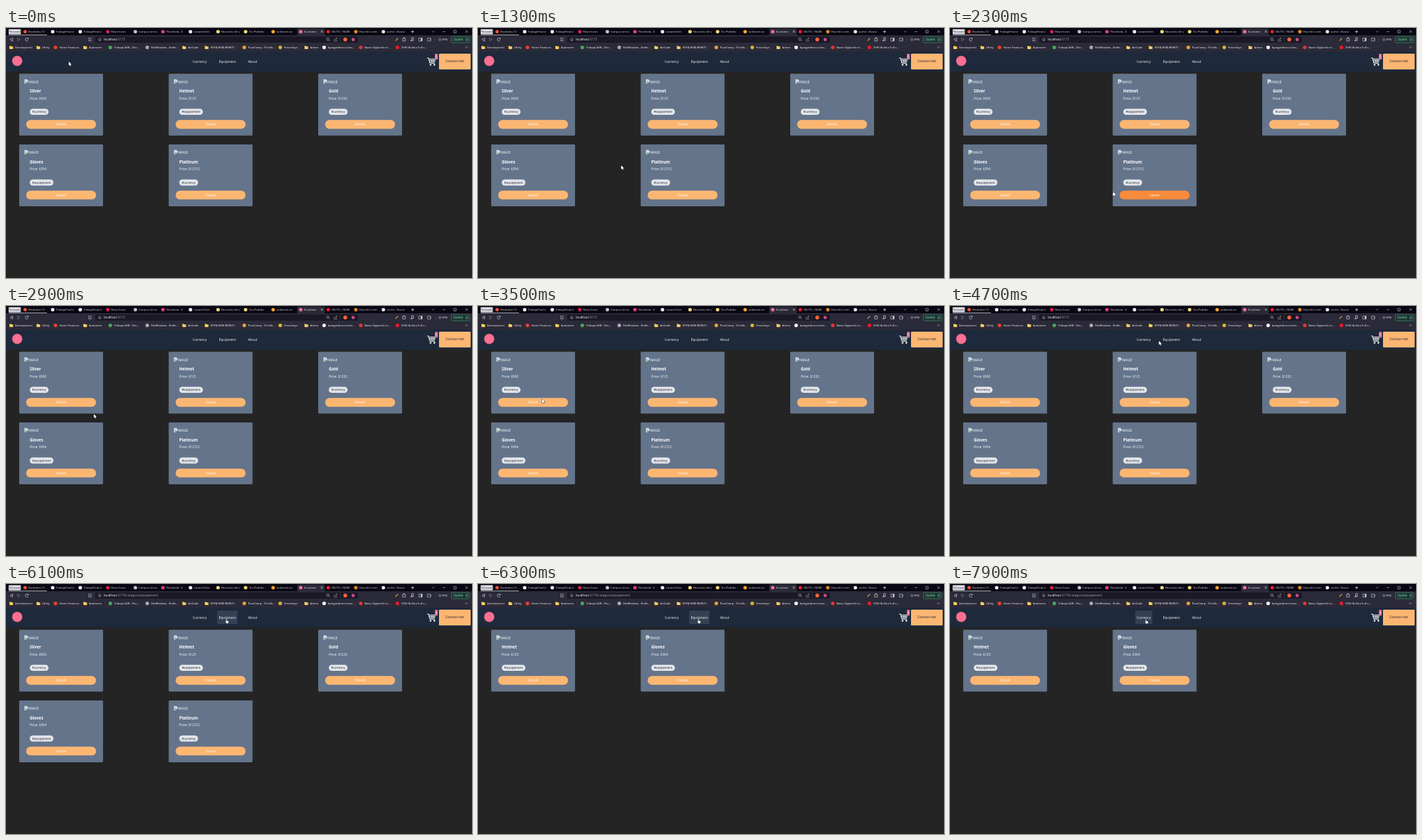
Write an HTML page with a canvas that moves like this. It is 706x380 px and loops after 8 s.

```html
<!DOCTYPE html>
<html lang="en">
<head>
<meta charset="utf-8">
<title>Shop walkthrough</title>
<style>
  html, body { margin: 0; width: 100%; height: 100%; overflow: hidden; background: #242424; }
  canvas { display: block; width: 706px; height: 380px; }
</style>
</head>
<body>
<canvas id="stage"></canvas>
<script>
const W = 706, H = 380, LOOP = 8000, STEP = 100;
const canvas = document.getElementById('stage');
const ctx = canvas.getContext('2d');
const dpr = window.devicePixelRatio || 1;
canvas.width = W * dpr;
canvas.height = H * dpr;

const FONT = '"Open Sans", "Noto Sans", sans-serif';
const ORANGE = '#fbb672', ORANGE_HOT = '#f98b3c', PINK = '#fb6f92', NAVY = '#1e293b';
const GREY = '#d6d6de', FOLDER = '#f8d05c', WHITE = '#ffffff', TOOLBAR = '#2b2a39';

// ---- drawing helpers ----
function box(x, y, w, h, color, r = 0) {
  ctx.fillStyle = color;
  ctx.beginPath();
  ctx.roundRect(x, y, w, h, r);
  ctx.fill();
}

function dot(x, y, r, color) {
  ctx.fillStyle = color;
  ctx.beginPath();
  ctx.arc(x, y, r, 0, Math.PI * 2);
  ctx.fill();
}

// y is the middle of the capital letters
function text(str, x, y, size, color, align = 'left', weight = 400) {
  ctx.font = `${weight} ${size}px ${FONT}`;
  ctx.textAlign = align;
  ctx.fillStyle = color;
  ctx.fillText(str, x, y + size * 0.36);
}

function path(d, color, width = 0.7, dx = 0, dy = 0) {
  ctx.save();
  ctx.translate(dx, dy);
  ctx.strokeStyle = color;
  ctx.lineWidth = width;
  ctx.stroke(new Path2D(d));
  ctx.restore();
}

function shape(d, x, y, fill, line, width) {
  const p = new Path2D(d);
  ctx.save();
  ctx.translate(x, y);
  ctx.lineJoin = 'round';
  ctx.strokeStyle = line;
  ctx.lineWidth = width;
  ctx.stroke(p);
  ctx.fillStyle = fill;
  ctx.fill(p);
  ctx.restore();
}

// ---- browser frame ----
const tabs = [
  ['Recibidos (1)', '#e8503f'], ['TrabajoFinal-e', '#f0f0f2'], ['TrabajoFinal-e', '#f0f0f2'],
  ['React Icons', '#d5224f'], ['Campus virtual', '#b9c3cf'], ['Floralinda - E', '#e23c78'],
  ['LunaresTom', '#f0f0f2'], ['Resumen del p', '#f1d77c'], ['Tus Pedidos', '#f1d77c'],
  ['aulanorte-ec', '#f6a52c'], ['E-comme', PINK], ['VELTO | NUBE', '#f0182c'],
  ['How do I center', '#e58330'], ['useful - Busca', '#e4e4e8']
];

// label, icon x, icon colour (none means a folder)
const marks = [
  ['Development', 8], ['Utility', 49], ['Home Finances', 75, '#e8452f'], ['Aulanorte', 120],
  ['Trabajo-K4B - Doc...', 158, '#47a85a'], ['FileMeadow - Endle...', 214, '#a9a9b2'],
  ['ArtCode', 270], ['VISTA WEB REMOT...', 304], ['PuzzCamp - The Be...', 361, '#e9a23b'],
  ['Heronkeys', 415.5, '#d8b62c'], ['Anime', 455], ['bytegardens-io/ma...', 482, '#f0f0f2'],
  ['Bazar Digital de m...', 537.5, '#e5352f'], ['(396) Build a Full s...', 593, '#f0182c']
];

function drawTabs() {
  box(0, 0, W, 11, '#090812');
  box(4, 1.8, 18.5, 7.6, '#dddde3', 1);
  text('Personal', 13.2, 5.6, 4.1, '#15151d', 'center');
  box(4, 10.2, 58, 0.7, '#dddde3');
  box(441, 0.8, 42, 10.4, TOOLBAR, 1.5);
  tabs.forEach(([label, color], i) => {
    const x = 29 + i * 41.75;
    dot(x, 5.6, 2.7, color);
    ctx.save();
    ctx.beginPath();
    ctx.rect(x + 4, 0, i === 10 ? 20 : 28.5, 11);
    ctx.clip();
    text(label, x + 5, 5.6, 4.2, i === 10 ? WHITE : GREY);
    ctx.restore();
  });
  path('M477 4l3 3m0-3l-3 3', WHITE, 0.6);
  path('M613.8 5.6h4.4m-2.2-2.2v4.4', WHITE, 0.7);
  path('M645.3 4.6l1.7 1.7 1.7-1.7M661.3 5.6h4M678.5 3.8h3.6v3.6h-3.6zM696 3.6l3.8 3.8m0-3.8l-3.8 3.8', GREY, 0.6);
}

function drawToolbar(url) {
  box(0, 11, W, 25.5, TOOLBAR);
  path('M10 15v5l-3.8-2.5z', GREY, 0.7);
  path('M17.6 15v5l3.8-2.5z', '#7b7986', 0.7);
  path('M33.4 16.2a2.3 2.3 0 1 0 .2 2.4M33.8 14.8v1.9h-1.9', GREY, 0.7);
  path('M125.6 15.2h3.2v4.9l-1.6-1.3-1.6 1.3z', GREY, 0.6);
  box(135, 13, 398, 9.2, '#1a1925', 1.5);
  path('M144 17.6a2 2 0 1 1-4 0a2 2 0 1 1 4 0M142 17.2v1.6', GREY, 0.5);
  text('localhost', 148, 17.7, 4.8, WHITE);
  text(url, 148 + ctx.measureText('localhost').width, 17.7, 4.8, '#a2a1ad');
  path('M489.3 17a1.8 1.8 0 1 1-3.6 0a1.8 1.8 0 1 1 3.6 0M488.9 18.4l1.4 1.5', GREY, 0.6);
  path('M497.2 16.8v3.2h4v-1.6M498.6 18q.2-2.2 3-2.2m-1.1-1.2l1.2 1.2-1.2 1.2', GREY, 0.5);
  box(506.5, 14, 0.5, 7, '#494758');
  dot(514, 17.5, 2.9, '#f2663a');
  dot(526, 17.5, 2.5, '#c64a8c');

  path('M590 19.3l3.8-3.8', '#f0a04b', 1.2);
  path('M601 15.8h4.2v4h-4.2zM602.3 15.8v-1h1.6v1', GREY, 0.7);
  path('M614.5 19.2v-4.3l2.6-.5v4', GREY, 0.7);
  dot(613.8, 19.3, 0.9, GREY);
  dot(616.4, 18.6, 0.9, GREY);
  path('M625.5 15.2h5v4.6h-5z', GREY, 0.6);
  box(628.5, 15.2, 2, 4.6, GREY);
  path('M638.6 15.5h5v4.3h-5zM641.6 17.6h2', GREY, 0.6);
  box(650.3, 14, 0.5, 7, '#494758');
  path('M659 17.6a1.6 1.6 0 1 1-3.2 0a1.6 1.6 0 1 1 3.2 0', GREY, 0.6);
  text('VPN', 660.5, 17.7, 4.2, '#f2f2f5');
  box(674.6, 13, 28, 9.4, '#203634', 1.5);
  ctx.strokeStyle = '#43996f';
  ctx.lineWidth = 0.6;
  ctx.stroke();
  text('Update', 677.5, 17.7, 4.4, '#72dca5');
  path('M696.5 16h4m-4 1.6h4m-4 1.6h4', '#72dca5', 0.5);
}

function drawMarks() {
  for (const [label, x, color] of marks) {
    if (color) dot(x, 29.5, 2.7, color);
    else {
      box(x - 2.7, 27.2, 2.6, 2, FOLDER, 0.5);
      box(x - 2.7, 27.9, 5.4, 4, FOLDER, 0.5);
    }
    text(label, x + 5.8, 29.5, 4.2, WHITE);
  }
  path('M696 28.2l1.3 1.3-1.3 1.3m1.8-2.6l1.3 1.3-1.3 1.3', GREY, 0.5);
}

// ---- shop page ----
const links = [
  ['Currency', 293.6, 26], ['Equipment', 335.3, 31], ['About', 373.5, 21]
];
const items = [
  ['Silver', 500, 'currency'], ['Helmet', 125, 'equipement'], ['Gold', 1232, 'currency'],
  ['Gloves', 364, 'equipement'], ['Platinum', 12312, 'currency']
];

function drawHeader(hover) {
  box(0, 36.3, W, 29.7, NAVY);
  dot(17, 50, 7.7, PINK);
  for (const [label, x, w] of links) {
    if (label === hover) box(x - w / 2, 40.6, w, 20.5, '#334155', 0.8);
    text(label, x, 51.2, 5.05, WHITE, 'center');
  }
  // cart
  path('M637.8 45.6h2.4l2 8.1h7.8', WHITE, 1);
  path('M640.6 47h10l-1.5 4.9h-7.2zM641.2 49.4h8.7M643.8 47l.6 4.9M646 47v4.9M648.3 47l-.6 4.9', WHITE, 0.8);
  dot(643.2, 56, 1.3, WHITE);
  dot(649, 56, 1.3, WHITE);
  box(649.8, 39.3, 4.3, 8.6, PINK, 1.2);
  text('0', 652, 43.6, 4.3, WHITE, 'center');
  box(656, 39, 48, 24, ORANGE, 1.3);
  text('Contact me!', 680, 50, 5.05, '#1b2232', 'center');
}

function drawBrokenImage(x, y) {
  shape('M0 0H3.4L5 1.6V3.2L2.2 6H0z', x, y, '#f4f7fa', '#f4f7fa', 0.2);
  box(x + 0.7, y + 0.9, 3, 2.6, '#b4d0f2');
  shape('M0 2.6L1.5 1 2.8 2.2 2 3H0z', x + 0.7, y + 2.2, '#4fa64f', '#4fa64f', 0.2);
}

function drawCard([name, price, tag], i, hover) {
  const x = 20 + (i % 3) * 226.5, y = 69.5 + Math.floor(i / 3) * 107.4;
  box(x, y, 127, 94, '#64748b', 1.3);
  drawBrokenImage(x + 8.2, y + 8.8);
  text('IMAGE', x + 14, y + 12.2, 5, WHITE);
  text(name, x + 16, y + 26.4, 6.2, WHITE, 'left', 700);
  text('Price: $' + price, x + 16, y + 37.4, 4.95, WHITE);
  const label = '#' + tag;
  ctx.font = `400 4.5px ${FONT}`;
  box(x + 16, y + 53.3, ctx.measureText(label).width + 7.4, 9.3, '#e5e7eb', 4.65);
  text(label, x + 19.7, y + 58, 4.5, '#273142');
  box(x + 10.5, y + 70.3, 106, 13.4, name === hover ? ORANGE_HOT : ORANGE, 6.7);
  text('Details', x + 63.5, y + 77, 4.95, '#fff8ef', 'center');
}

// ---- pointer ----
const route = [
  [0, 95, 51], [800, 166, 160], [1200, 166, 160], [1500, 362, 348], [1700, 362, 348],
  [1900, 353.5, 335], [2000, 353.5, 335], [2300, 247, 248], [2400, 152.5, 176.5],
  [2500, 152.5, 176.5], [3500, 97, 141], [3800, 97, 148], [4200, 97, 148],
  [4700, 316.5, 53], [4900, 296, 53], [5100, 296, 53], [5400, 333.5, 53],
  [6800, 333.5, 53], [7300, 220, 180], [7400, 220, 180], [7900, 296.5, 53.5]
];
// from, until, hovered control
const hovers = [
  [2200, 2400, 'Platinum'], [3600, 4300, 'Silver'], [4900, 5200, 'Currency'],
  [5300, 6900, 'Equipment'], [7800, LOOP, 'Currency']
];
const ARROW = 'M0 0V6.1L1.5 4.9 2.5 7 3.5 6.5 2.6 4.5H4.5z';
const HAND = 'M0 .5Q.5-.3 1 .5V2.7L3.2 3.2Q3.8 3.4 3.7 4.2L3.2 6.8H.5L-1.2 4.3Q-1 3.5 0 4.3z';

function pointerAt(t) {
  const i = route.findIndex(k => k[0] > t);
  if (i < 0) return route[route.length - 1].slice(1);
  const [t0, x0, y0] = route[i - 1], [t1, x1, y1] = route[i];
  const u = (t - t0) / (t1 - t0), e = u * u * (3 - 2 * u);
  return [x0 + (x1 - x0) * e, y0 + (y1 - y0) * e];
}

function draw(t) {
  const hover = (hovers.find(([a, b]) => t >= a && t < b) || [])[2];
  ctx.setTransform(dpr, 0, 0, dpr, 0, 0);
  box(0, 0, W, H, '#242424');
  drawTabs();
  drawToolbar(t < 6000 ? ':5173' : ':5173/category/equipement');
  drawMarks();
  drawHeader(hover);
  const shown = t < 6300 ? items : items.filter(item => item[2] === 'equipement');
  shown.forEach((item, i) => drawCard(item, i, hover));
  const [x, y] = pointerAt(t);
  shape(hover ? HAND : ARROW, x, y, WHITE, '#10131a', 0.8);
}

let start;
function tick(now) {
  start ??= now;
  const t = (now - start) % LOOP;
  draw(Math.floor(t / STEP) * STEP);
  requestAnimationFrame(tick);
}
draw(0);
requestAnimationFrame(tick);
</script>
</body>
</html>
```
